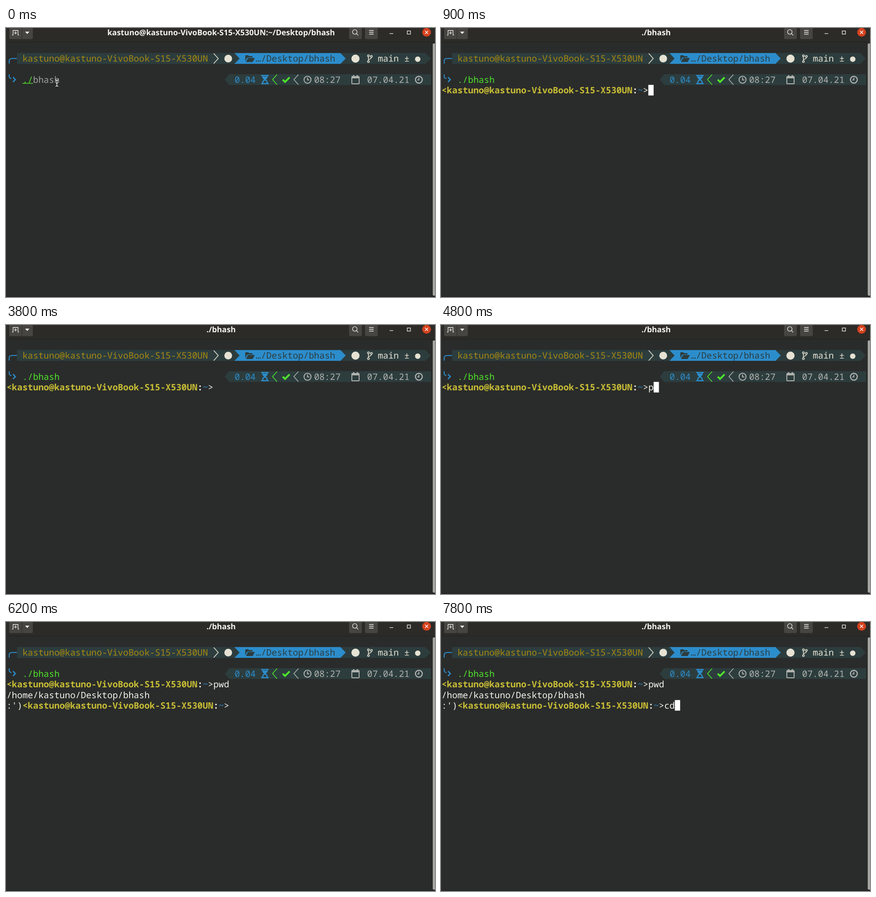
Animation of 944x593 px, one loop 8000 ms. Source, as an HTML page:

```html
<!DOCTYPE html>
<html lang="en">
<head>
<meta charset="utf-8">
<title>Terminal</title>
<style>
  html, body { margin: 0; width: 100%; height: 100%; overflow: hidden; background: #2a2c2b; }
  svg { display: block; width: 944px; height: 593px; }
  text { white-space: pre; text-rendering: geometricPrecision; }
  #term text { font: 19.444px "Noto Sans Mono", "DejaVu Sans Mono", monospace; }
  #term .bold { font-weight: 700; }
  #title { font: 700 17.15px "Noto Sans", "Open Sans", sans-serif; fill: #f5f4f0; text-anchor: middle; }
  .line { fill: none; stroke-width: 1.6; }
</style>
</head>
<body>
<svg viewBox="0 0 944 593">
  <rect width="944" height="593" fill="#2a2c2b"/>

  <!-- title bar -->
  <rect width="944" height="30" fill="#2c2b28"/>
  <rect y="30" width="944" height="1" fill="#222220"/>
  <g fill="#464541">
    <path d="M7 0H34.5V24.5H10Q7 24.5 7 21.5Z M35.5 0H59V21.5Q59 24.5 56 24.5H35.5Z"/>
    <path d="M755 0H783V21.5Q783 24.5 780 24.5H758Q755 24.5 755 21.5Z"/>
    <path d="M790 0H818V21.5Q818 24.5 815 24.5H793Q790 24.5 790 21.5Z"/>
  </g>
  <g class="line" stroke="#f0efeb" style="stroke-width:1.3">
    <path d="M13.5 15.5H15.500V5.500H26.500V15.500H28.5 M21 7.5V14 M17.8 10.8H24.2"/>
    <circle cx="767.5" cy="8.7" r="5"/>
    <path d="M771.2 12.4L775 16.2 M799 5.500H809 M799 9.500H809 M799 13.500H809 M844 12.3H852"/>
    <rect x="883" y="6.5" width="7" height="7"/>
  </g>
  <path d="M42 8H51.5L46.8 13.3Z" fill="#f0efeb"/>
  <circle cx="925.5" cy="9.5" r="9.7" fill="#d4411d"/>
  <path class="line" d="M922 6L929 13M929 6L922 13" stroke="#fff" style="stroke-width:1.4"/>
  <text id="title" x="473.4" y="16.4"></text>
  <rect x="939" y="34" width="6" height="556" rx="2.5" fill="#a6a6a3"/>
  <rect y="591" width="944" height="2" fill="#232524"/>

  <!-- upper prompt bar -->
  <path d="M24.3 55.3H923L934.5 67.2L923 79H24.3Z" fill="#2d3d3e"/>
  <path d="M502.7 55.3H736L747.5 67.2L736 79H502.7L514 67.2Z" fill="#2c8dcc"/>
  <g class="line">
    <path d="M24 67.2H13Q7 67.2 7 73V78.5" stroke="#2c8dcc" style="stroke-width:2"/>
    <path d="M457 56L467 67.2L457 78.5" stroke="#e6e2d3"/>
  </g>
  <circle cx="489" cy="67.5" r="8.5" fill="#e6e2d3"/>
  <path d="M526.5 73V61.5Q526.5 60 528 60H533L535 62H541Q542.5 62 542.5 63.5V65H532.5Q531 65 530 66.5Z
           M528 75L532 67Q532.5 66 534 66H547.5L543.5 74Q543 75 541.5 75Z" fill="#2d3d3e"/>
  <circle cx="769" cy="67.5" r="9" fill="#e6e2d3"/>
  <g class="line" stroke="#e6e2d3">
    <circle cx="797.5" cy="61.3" r="2"/>
    <circle cx="797.5" cy="74" r="2"/>
    <circle cx="804" cy="62.5" r="2"/>
    <path d="M797.5 63.3V72M804 64.5Q804 68 797.8 69.5"/>
  </g>
  <circle cx="906" cy="68.8" r="6" fill="#e6e2d3"/>

  <!-- lower prompt bar -->
  <path d="M491 102H935V125.5H491L481.5 113.7Z" fill="#2d3d3e"/>
  <g class="line">
    <path d="M7 102V106Q7 111 12 111.5" stroke="#2c8dcc" style="stroke-width:2"/>
    <path d="M15.5 108.5L20.5 113.7L15.5 119" stroke="#2c8dcc" style="stroke-width:2.6"/>
    <path d="M596.5 102.5L586.5 113.7L596.5 125" stroke="#4fe52a"/>
    <path d="M643.5 102.5L633.5 113.7L643.5 125" stroke="#b1b2ae"/>
    <path d="M609 113.8L614 118.8L624 108.8" stroke="#4fe52a" style="stroke-width:4"/>
  </g>
  <path d="M561.5 103.5H578V106H576Q576 111 571.5 113.7Q576 116 576 121.5H578V124H561.5V121.5H563.5Q563.5 116 568 113.7Q563.5 111 563.5 106H561.5Z" fill="#2c8dcc"/>
  <path d="M566 106.5H573.5M566.5 121Q567 116.5 569.8 116.5T573 121Z" fill="#2d3d3e" stroke="#2d3d3e"/>
  <g class="line" stroke="#b1b2ae" style="stroke-width:2">
    <circle cx="663.5" cy="114" r="7.7"/>
    <path d="M663.5 109V114.5H667.5"/>
    <rect x="761" y="107" width="16" height="16" rx="1"/>
    <path d="M761 109.5H777M765 104V108M773 104V108" style="stroke-width:3"/>
    <circle cx="908.5" cy="114" r="7.5" style="stroke-width:2.4"/>
    <path d="M908.5 109.5V114.5H905"/>
  </g>

  <g id="term"></g>
  <path id="pointer" class="line" d="M109 114.5Q112 114.5 112 117V126Q112 128.5 109 128.5M115 114.5Q112 114.5 112 117M112 126Q112 128.5 115 128.5M110 121.5H114"
        stroke="#f2f2f2" style="stroke-width:1.3"/>
</svg>
<script>
const COL = 11.667, ROW = 23.333, LOOP = 8000;
const WHITE = '#f4f4ee', GREEN = '#4fe52a', BLUE = '#2c8dcc', CREAM = '#e6e2d3',
      GREY = '#b1b2ae', YELLOW = '#c8bd35', DIM = '#a0a19d';
const user = 'kastuno', host = user + '@' + user + '-VivoBook-S15-X530UN';
const $ = id => document.getElementById(id);
const term = $('term');

function add(tag, attrs) {
  const el = document.createElementNS('http://www.w3.org/2000/svg', tag);
  for (const key in attrs) el.setAttribute(key, attrs[key]);
  return term.appendChild(el);
}

const colX = col => 1.2 + col * COL;
const rowY = row => 55.4 + row * ROW;

function write(col, row, str, fill, cls = '') {
  const el = add('text', { x: colX(col), y: rowY(row) + 18.8, fill, class: cls });
  el.textContent = str;
  return el;
}

function prompt(col, row) {
  return [
    write(col, row, '<' + host, YELLOW, 'bold'),
    write(col + 36, row, ':', WHITE, 'bold'),
    write(col + 37, row, '~', BLUE),
    write(col + 38, row, '>', WHITE)
  ];
}

const show = (el, on) => el.setAttribute('visibility', on ? 'visible' : 'hidden');

write(3, 0, host, '#a8890f');
write(47, 0, '…/Desktop/bhash', '#2d3d3e');
write(70, 0, 'main', CREAM);
write(75, 0, '±', CREAM);
write(43, 2, '0.04', BLUE);
write(58, 2, '08:27', GREY);
write(68, 2, '07.04.21', GREY);
write(3, 2, './', GREEN);
const command = write(5, 2, 'bhash', DIM);
const underline = add('rect', { x: colX(3), y: 121.3, height: 1.4, fill: GREEN });

const first = prompt(0, 3);
const typedPwd = write(39, 3, '', WHITE);
const second = [
  write(0, 4, '/home/' + user + '/Desktop/bhash', WHITE),
  write(0, 5, ":')", WHITE),
  ...prompt(3, 5)
];
const typedCd = write(42, 5, '', WHITE);
const cursor = add('rect', { width: COL, height: ROW, fill: '#fff' });

// [start time, column, row] of the block cursor; no column means hidden
const cursorSteps = [
  [0], [500, 10, 2], [900, 39, 3], [1400], [2500, 39, 3], [2600], [3200, 39, 3], [3800],
  [4400, 39, 3], [4800, 40, 3], [4900, 41, 3], [5300, 42, 3],
  [5600, 42, 5], [6200], [6800, 42, 5], [7400], [7600, 43, 5], [7800, 44, 5]
];
const typed = (str, times, t) => str.slice(0, times.filter(at => t >= at).length);

function draw(t) {
  $('title').textContent = t < 900 ? host + ':~/Desktop/bhash' : './bhash';
  command.setAttribute('fill', t < 200 ? DIM : GREEN);
  underline.setAttribute('width', COL * (t < 200 ? 2 : 7));
  show(underline, t < 500);
  show($('pointer'), t < 200);
  first.forEach(el => show(el, t >= 900));
  second.forEach(el => show(el, t >= 5600));
  typedPwd.textContent = typed('pwd', [4800, 4900, 5300], t);
  typedCd.textContent = typed('cd', [7600, 7800], t);

  const [, col, row] = cursorSteps.filter(step => t >= step[0]).pop();
  show(cursor, col !== undefined);
  if (col !== undefined) {
    cursor.setAttribute('x', colX(col));
    cursor.setAttribute('y', rowY(row));
  }
}

function frame() {
  draw(performance.now() % LOOP);
  requestAnimationFrame(frame);
}
frame();
</script>
</body>
</html>
```
